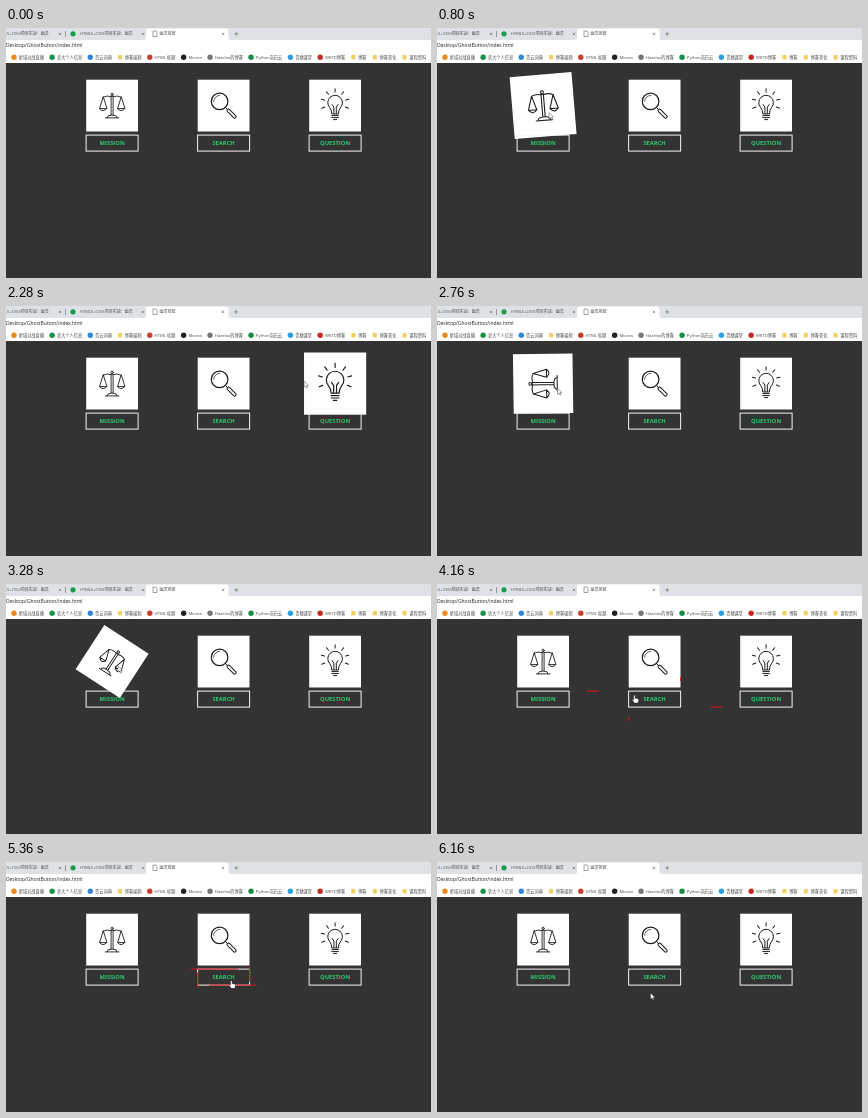
Recreate the animation shown at these times as an HTML page. Size 425 px wide and 250 px high, loop 6360 ms.

```html
<!DOCTYPE html>
<html lang="zh">
<head>
<meta charset="utf-8">
<title>幽灵按钮</title>
<style>
html, body { margin: 0; width: 100%; height: 100%; overflow: hidden; background: #333; }
svg { display: block; width: 425px; height: 250px; }
text { font-family: "Open Sans", "Noto Sans CJK SC", "Noto Sans CJK", sans-serif; fill: #4a4a4a; }
.tab { font-size: 4px; }
.mark { font-size: 4.2px; }
.url { font-size: 4.95px; fill: #222; }
.label { font-size: 5.8px; font-weight: 700; fill: #2ecc71; text-anchor: middle; }
.ink { fill: none; stroke: #1c1c1c; stroke-linecap: round; stroke-linejoin: round; }
.thin { fill: none; stroke: #666; stroke-width: .6; }
.line { fill: #e5121b; }
#cursor path { fill: #fff; stroke: #222; stroke-width: .4; }
</style>
</head>
<body>
<svg viewBox="0 0 425 250" xmlns="http://www.w3.org/2000/svg">
  <rect width="425" height="250" fill="#333"/>
  <rect width="425" height="35" fill="#fff"/>
  <rect width="425" height="12" fill="#dee1e6"/>
  <path d="M138 12Q140 12 140 10V3Q140 .5 142.5 .5H220Q222.5 .5 222.5 3V10Q222.5 12 224.500 12Z" fill="#fff"/>
  <g id="tabs">
    <text class="tab" x="-1" y="7.400">L5+CSS3项目实战：幽灵</text>
    <text class="tab" x="74" y="7.400">HTML5+CSS3项目实战：幽灵</text>
    <text class="tab" x="153.500" y="7.400">幽灵按钮</text>
    <circle cx="67" cy="5.800" r="2.600" fill="#1d9a4b"/>
    <path class="thin" d="M59.500 3V9M147 3H150L151 4V8.500H147ZM228.200 5.900h4m-2-2v4"/>
  </g>
  <text class="url" x="0" y="19.300">Desktop/GhostButton/index.html</text>
  <g id="marks"></g>
  <g id="icons"></g>
  <g id="buttons"></g>
  <g id="cursor">
    <path id="arrow" d="M0 0V6.200L1.500 4.900L2.500 7.100L3.500 6.600L2.600 4.500H4.500Z"/>
    <path id="hand" d="M1.200 .6Q2-.3 2.700 .6V3.200L5.400 3.800Q6.200 4.100 6.100 5L5.500 8H2L-.3 5.100Q-.2 4.100 1.200 5Z"/>
  </g>
</svg>
<script>
const LOOP = 6360, STEP = 40, DURATION = 400;
const CARD = 51.8, CARD_Y = 77.6, BTN_W = 53, BTN_H = 17, BTN_Y = 106.6;
const $ = id => document.getElementById(id);

function set(el, attrs) {
  for (const key in attrs) el.setAttribute(key, attrs[key]);
  return el;
}

function add(parent, tag, attrs, text = '') {
  const el = set(document.createElementNS('http://www.w3.org/2000/svg', tag), attrs);
  el.textContent = text;
  return parent.appendChild(el);
}

const ink = (g, d, width = 1) => add(g, 'path', { class: 'ink', d, 'stroke-width': width });

// Browser chrome
for (const x of [54, 137, 217])
  add($('tabs'), 'path', { class: 'thin', d: `M${x - 1.2} 4.7l2.4 2.4m0-2.4l-2.4 2.4` });

const bookmarks = [
  ['星域对战直播', '#ee8a1d'], ['农大个人信息', '#159447'], ['青云词典', '#2f86d8'], ['博客编辑'],
  ['HTML 标题', '#c8402c'], ['Mivora', '#222'], ['Hazelox的博客', '#777'], ['Python岚石云', '#178c45'],
  ['青穗课堂', '#2b9fe0'], ['WKTD博客', '#c82a22'], ['博客'], ['博客美化'], ['课程资料']
];
let markX = 8;
for (const [text, color] of bookmarks) {
  if (color) add($('marks'), 'circle', { cx: markX, cy: 29.2, r: 2.7, fill: color });
  else add($('marks'), 'rect', { x: markX - 2, y: 27, width: 4, height: 4.4, fill: '#f5cf5b' });
  const label = add($('marks'), 'text', { class: 'mark', x: markX + 4.8, y: 30.8 }, text);
  markX += label.getComputedTextLength() + 13;
}

// Artwork, drawn around the centre of each card
function scales(g) {
  ink(g, 'M-1 9.500V-9.500H1V9.500M-1-9Q-5-10.500-9-8.500M1-9Q5-10.500 9-8.500M-5 12.200Q-5 9.500-1 9.500H1Q5 9.500 5 12.200M-6.800 12.300H6.800', .9);
  add(g, 'circle', { class: 'ink', cy: -11.2, r: 1.2, 'stroke-width': .9 });
  for (const x of [-9, 9])
    ink(g, `M${x}-8.500l-3.500 11.500h7ZM${x - 3.5} 3q3.5 4.400 7 0`, .9);
}

function magnifier(g) {
  ink(g, 'M2 2L4.500 4.500');
  ink(g, 'M5 5L11 11', 4);
  g.lastChild.insertAdjacentElement('afterend', set(g.lastChild.cloneNode(), { 'stroke-width': 2, style: 'stroke:#fff' }));
  add(g, 'circle', { class: 'ink', cx: -4, cy: -4.2, r: 8.3, 'stroke-width': 1.2 });
  ink(g, 'M-10-4.200A6 6 0 0 1-4-10.200', .7);
}

function bulb(g) {
  ink(g, 'M-3.300 8Q-3.300 4.500-5.600 1.700A7.300 7.300 0 1 1 5.600 1.700Q3.300 4.500 3.300 8Z' +
    'M-3.300 10H3.300M-3.300 12H3.300M-1.500 14H1.500M-1.200 8V1.500L-3-1M1.200 8V1.500L3-1');
  for (let i = -3; i <= 3; i++)
    add(g, 'path', { class: 'ink', d: 'M0-11V-14.300', transform: `translate(0 -2.5) rotate(${i * 37})` });
}

// Hover times alternate between entering and leaving
const cards = [
  { name: 'MISSION', art: scales, icon: [460, 1125, 2580, 2920, 3246, 3560], button: [] },
  { name: 'SEARCH', art: magnifier, icon: [1518, 1666, 2382, 2480], button: [4093, 4256, 5120, 5480] },
  { name: 'QUESTION', art: bulb, icon: [1830, 2290, 4814, 4994], button: [4370, 4680] }
];

cards.forEach((card, i) => {
  const x = card.x = 106.1 + 111.5 * i;
  card.el = add($('icons'), 'g', {});
  add(card.el, 'rect', { x: -CARD / 2, y: -CARD / 2, width: CARD, height: CARD, fill: '#fff' });
  card.art(card.el);
  add($('buttons'), 'rect', {
    x: x - BTN_W / 2 + .5, y: BTN_Y + .5, width: BTN_W - 1, height: BTN_H - 1, fill: 'none', stroke: '#f4f4f4'
  });
  add($('buttons'), 'text', { class: 'label', x, y: 117.4 }, card.name);
  card.lines = [0, 1, 2, 3].map(() => add($('buttons'), 'rect', { class: 'line' }));
});

// The CSS "ease" curve, solved by bisection
function ease(x) {
  if (x <= 0 || x >= 1) return x <= 0 ? 0 : 1;
  const bezier = (a, b, u) => 3 * a * u * (1 - u) ** 2 + 3 * b * u * u * (1 - u) + u ** 3;
  let lo = 0, hi = 1;
  for (let i = 0; i < 20; i++) {
    const mid = (lo + hi) / 2;
    if (bezier(.25, .25, mid) < x) lo = mid; else hi = mid;
  }
  return bezier(.1, 1, lo);
}

const hovered = (times, t) => times.filter(time => time <= t).length % 2;

// Value of a transition that may be reversed midway
function transition(times, t) {
  let start = 0, from = 0, to = 0;
  const at = time => from === to ? to : from + (to - from) * ease((time - start) / (DURATION * Math.abs(to - from)));
  for (const time of times.filter(time => time <= t)) {
    [from, start, to] = [at(time), time, 1 - to];
  }
  return at(t);
}

// Pointer key points: time, x, y
const path = [
  [360, 160, 228], [460, 112, 96], [1000, 112, 78], [1125, 137, 75], [1360, 136, 70], [1830, 303, 80],
  [2050, 326, 82], [2280, 298, 75], [2640, 108, 80], [2920, 137, 85], [3100, 150, 122], [3280, 112, 82],
  [3560, 138, 90], [4093, 190, 116], [4160, 195.5, 111], [4400, 318, 112], [4814, 312, 96],
  [4880, 258, 89.5], [5120, 238, 111], [5480, 216, 122], [5640, 213.5, 131], [LOOP, 213.5, 131]
];

function pointer(t) {
  const i = path.findIndex(p => p[0] > t);
  if (i < 1) return null;
  const [t0, x0, y0] = path[i - 1], [t1, x1, y1] = path[i], k = (t - t0) / (t1 - t0);
  return [x0 + (x1 - x0) * k, y0 + (y1 - y0) * k];
}

// Each red line slides in from its own side while growing to full length
function drawLines(lines, x, p) {
  const w = BTN_W * p, h = BTN_H * p, left = x - BTN_W / 2, right = left + BTN_W, bottom = BTN_Y + BTN_H;
  const boxes = [
    [left - BTN_W + w, BTN_Y, w, 1],
    [right + BTN_W - 2 * w, bottom - 1, w, 1],
    [left, bottom + BTN_H - 2 * h, 1, h],
    [right - 1, BTN_Y - BTN_H + h, 1, h]
  ];
  boxes.forEach(([x, y, width, height], i) => set(lines[i], { x, y, width, height }));
}

function draw(t) {
  for (const { x, el, icon, button, lines } of cards) {
    const p = transition(icon, t);
    set(el, { transform: `translate(${x} ${CARD_Y}) rotate(${360 * p}) scale(${1 + .2 * p})` });
    drawLines(lines, x, transition(button, t));
  }
  const pos = pointer(t), onButton = cards.some(card => hovered(card.button, t));
  $('arrow').style.display = pos && !onButton ? '' : 'none';
  $('hand').style.display = pos && onButton ? '' : 'none';
  if (pos) set($('cursor'), { transform: `translate(${pos})` });
}

const begin = performance.now();
function tick() {
  const t = (performance.now() - begin) % LOOP;
  draw(Math.floor(t / STEP) * STEP);
  requestAnimationFrame(tick);
}
tick();
</script>
</body>
</html>
```
